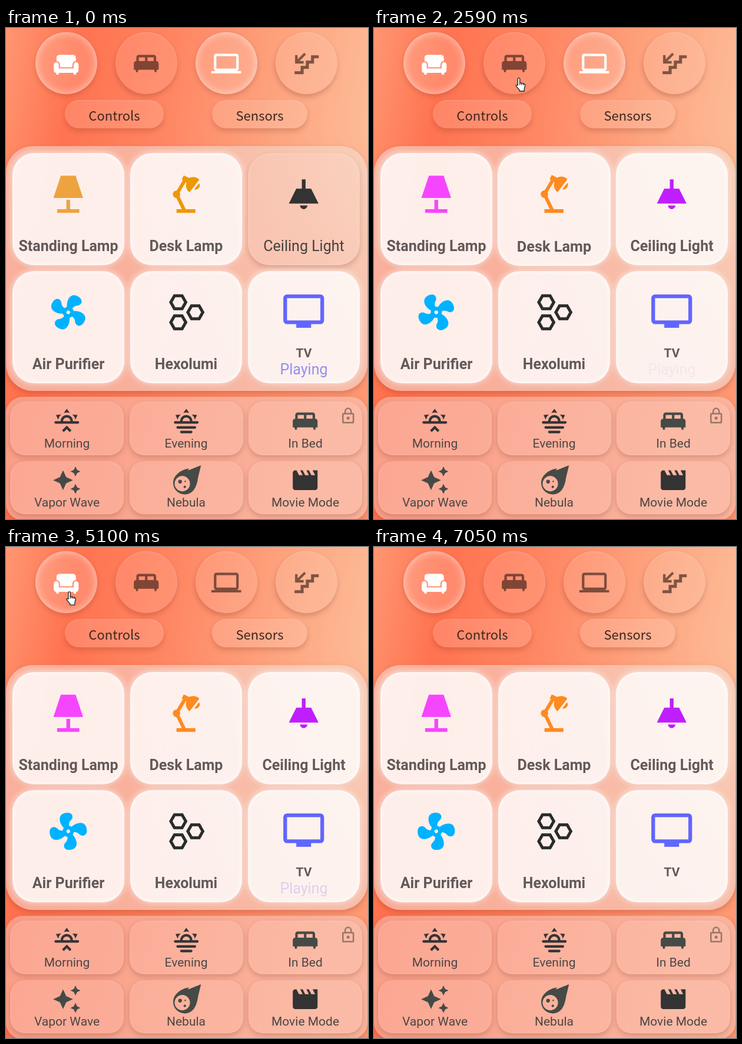
An HTML page for the animation above (7.1 s loop, 615x832 px).

```html
<!DOCTYPE html>
<html lang="en">
<head>
<meta charset="utf-8">
<style>
html, body { margin: 0; width: 100%; height: 100%; overflow: hidden; }
#stage {
  position: relative; width: 615px; height: 832px; overflow: hidden;
  font-family: Roboto, sans-serif;
  background:
    linear-gradient(rgba(255,110,75,0) 20%, rgba(255,110,75,.5) 75%),
    linear-gradient(100deg, #ff9672, #ff7350 17%, #ff8562 38%, #fda681 65%, #fdbf9a 88%);
}
#stage div, svg, span { position: absolute; box-sizing: border-box; }
svg { overflow: visible; fill: currentColor; }
.line { fill: none; stroke: currentColor; }
span { left: -20px; right: -20px; text-align: center; line-height: 30px; white-space: nowrap; }
.panel { background: rgba(244,228,222,.5); box-shadow: 0 4px 9px rgba(120,40,20,.25); }
.page { left: 0; top: 0; }
.round {
  border-radius: 50%; color: rgba(55,28,20,.63); background: rgba(255,255,255,.1);
  box-shadow: -1px 5px 9px rgba(120,40,20,.25), inset 0 1px 3px rgba(255,255,255,.2);
}
.round.lit {
  color: #fff; background: rgba(255,255,255,.16);
  box-shadow: 0 4px 9px rgba(120,40,20,.22), inset 0 0 14px rgba(255,255,255,.6);
}
.pill {
  border-radius: 24px; background: rgba(255,255,255,.13); color: #40261f;
  font: 300 22px "Noto Sans CJK JP", "Noto Sans CJK SC", "Noto Sans", sans-serif;
  box-shadow: 0 5px 9px rgba(120,40,20,.22), inset 0 1px 3px rgba(255,255,255,.15);
}
.tile {
  --on: 0; border-radius: 37px; color: #333; font-size: 25px;
  background: rgb(255 255 255 / calc(.09 + .71 * var(--on)));
  box-shadow:
    inset 0 0 6px 2px rgb(255 255 255 / calc(.1 + .6 * var(--on))),
    0 0 11px 2px rgb(255 240 234 / calc(.72 * var(--on))),
    0 5px 8px rgb(120 50 30 / calc(.22 - .16 * var(--on)));
}
.tile span { color: #474140; }
.tile.lit span { color: #635958; font-weight: 700; }
.tile.lit .state { color: #6b69f6; font-weight: 400; }
.scene {
  border-radius: 25px; font-size: 21px; color: #333; background: rgba(255,255,255,.09);
  box-shadow: 0 4px 8px rgba(120,50,30,.25), inset 0 0 4px rgba(255,255,255,.15);
}
.scene span { color: #4c4644; }
</style>
</head>
<body>
<div id="stage"></div>
<script>
const LOOP = 7100;
const stage = document.getElementById('stage');
const path = (d, attrs = 'fill-rule="evenodd"') => `<path d="${d}" ${attrs}/>`;
const line = (d, w) => path(d, `class="line" stroke-width="${w}"`);
const each = (n, f) => Array.from({ length: n }, (_, i) => f(i)).join('');

const sun = 'M3 12H7A5 5 0 0 1 17 12H21A1 1 0 0 1 21 14H3A1 1 0 0 1 3 12M15 12A3 3 0 0 0 9 12z' +
  'M12 2L14.4 5.4Q12 4.6 9.6 5.4zM3.3 7L7.5 6.65Q5.5 8.4 5.1 10.8zM20.7 7L18.9 10.8Q18.5 8.4 16.5 6.65z';
const hex = (x, y) => `M${x - 4.1} ${y}l2-3.5h4.1l2 3.5-2 3.5h-4.1z`;
const strip = (x, y) => path('M0 0h18v4H0z' + each(5, i => `M${1 + 3.55 * i} 1.1h1.8v1.8h-1.8z`),
  `fill-rule="evenodd" transform="translate(${x} ${y}) rotate(13)"`);

const icons = {
  sofa: path('M6.5 4h11a2.3 2.3 0 0 1 2.3 2.5V9a3 3 0 0 0-2.8 3v2H7v-2a3 3 0 0 0-2.8-3V6.5A2.3 2.3 0 0 1 6.5 4z' +
    'M2 12a2 2 0 0 1 4 0v3h12v-3a2 2 0 0 1 4 0v4.5a2 2 0 0 1-2 2V20h-2v-1.5H6V20H4v-1.5a2 2 0 0 1-2-2z'),
  bed: path('M20 10V7A2 2 0 0 0 18 5H6A2 2 0 0 0 4 7V10A2 2 0 0 0 2 12V17H3.3L4 19H5L5.7 17H18.3L19 19H20L20.7 17H22V12' +
    'A2 2 0 0 0 20 10M11 10H6V7H11zM18 10H13V7H18z'),
  laptop: path('M4 6H20V16H4zM20 18A2 2 0 0 0 22 16V6A2 2 0 0 0 20 4H4A2 2 0 0 0 2 6V16A2 2 0 0 0 4 18H0V20H24V18z'),
  stairs: line('M22 6.5h-5v4.3h-4.2v4.3H8.6v4.3H2.5', 2.4) + line('M11 4L4.5 10.5M3.9 5.2V11h5.9', 2),
  lamp: path('M8 2H16L20 14H4zM11 15H13V20H18V22H6V20H11z'),
  desk: path('M6.9 20H17.1V22H6.9zM10.8 1.8L13.6 3.2Q17 1.8 19.2 4.1L13.9 11Q11.4 9 12.2 5.6L9.7 4z' +
    'M19.1 6A2.3 2.3 0 0 1 16.5 9.4z') + '<circle cx="6.9" cy="12" r="2"/>' + line('M11 20.4L6.9 12L11.5 4.3', 1.9),
  ceiling: path('M8 9H11V4H13V9H16L20 17H4zM14 18A2 2 0 0 1 10 18z'),
  fan: path('M12 11A1 1 0 0 0 12 13A1 1 0 0 0 12 11M12.5 2C17 2 17.1 5.6 14.75 6.75C13.8 7.2 13.3 8.3 13.1 9.2' +
    'C13.6 9.4 14 9.7 14.35 10.1C18 8.1 22 8.9 22 12.5C22 17 18.5 17.1 17.3 14.7C16.8 13.7 15.7 13.3 14.8 13.1' +
    'C14.6 13.6 14.3 14 13.9 14.3C15.9 18 15 22 11.5 22C7 22 6.9 18.4 9.3 17.2C10.2 16.7 10.7 15.7 10.9 14.8' +
    'C10.4 14.6 10 14.3 9.65 13.9C6 15.8 2 15 2 11.5C2 7 5.6 6.9 6.7 9.3C7.2 10.2 8.3 10.7 9.2 10.9' +
    'C9.4 10.4 9.7 10 10.1 9.65C8.1 6 8.9 2 12.5 2z'),
  hexes: line(hex(7.9, 6.6) + hex(17.1, 12) + hex(7.9, 17.4), 1.6),
  tv: path('M21 17H3V5H21zM21 3H3A2 2 0 0 0 1 5V17A2 2 0 0 0 3 19H8V21H16V19H21A2 2 0 0 0 23 17V5A2 2 0 0 0 21 3z'),
  strips: strip(2.3, 2.9) + strip(4.2, 12.8) + path('M6.3 12.3L11.4 10.1 18 11.7 13.3 13.9z'),
  dragon: path('M16.5 2.4L20.5 2.1 24 4.5 24.1 7.6 21.5 8.5 19.3 7.2Q18 9.5 22 12.3Q25.5 15.5 23.5 20.5Q22.5 22 17 21.9' +
    'L0 21.4V20Q9 18.6 16 17.5Q11.5 14 13 7Q14 3.5 16.5 2.4z' +
    'M0 12.5Q5 5 12 4.8Q11.5 9 12.8 13.5L11 11.7 9 14 7 11.8 4.5 13.5 3 12z'),
  heater: path(each(3, i => `M${7.95 + 6 * i} 3l-1.42 2.2 1.42 2.2-2 3.1-1.73-.9 1.42-2.2-1.42-2.2 2-3.1z`) +
    'M2 22V14A2 2 0 0 1 4 12H20A2 2 0 0 1 22 14V22H20V20H4V22z' +
    each(4, i => `M${5 + 4 * i} 15a1 1 0 0 1 2 0v2a1 1 0 0 1-2 0z`)),
  sunrise: path(sun) + line('M8.9 20.1L12 17L15.1 20.1', 2),
  sunset: path(sun) + path('M5 17H19M8 20.7H16', 'class="line" stroke-width="2" stroke-linecap="round"'),
  sparkle: path('M19 1L17.7 3.7 15 5 17.7 6.3 19 9 20.3 6.3 23 5 20.3 3.7zM9 4L6.5 9.5 1 12 6.5 14.5 9 20 11.5 14.5 17 12 11.5 9.5z' +
    'M19 15L17.7 17.7 15 19 17.7 20.3 19 23 20.3 20.3 23 19 20.3 17.7z'),
  meteor: path('M23.9 0L21.5 10Q20.8 16 18 20A9.3 9.3 0 1 1 3.5 8.3Q7 3.9 14 2.5L13.4 4.2z' +
    'M15 14.8a6.2 6.2 0 1 0-12.4 0a6.2 6.2 0 1 0 12.4 0z') +
    '<circle cx="7" cy="13.2" r="1.5"/><circle cx="10.8" cy="17.4" r="1"/><circle cx="11.2" cy="13" r=".6"/>',
  movie: path('M18 4L20 8H17L15 4H13L15 8H12L10 4H8L10 8H7L5 4H4A2 2 0 0 0 2 6V18A2 2 0 0 0 4 20H20A2 2 0 0 0 22 18V4z'),
  lock: path('M12 17A2 2 0 0 1 12 13A2 2 0 0 1 12 17M18 20V10H6V20zM18 8A2 2 0 0 1 20 10V20A2 2 0 0 1 18 22H6A2 2 0 0 1 4 20V10' +
    'A2 2 0 0 1 6 8H7V6A5 5 0 0 1 17 6V8zM12 3A3 3 0 0 0 9 6V8H15V6A3 3 0 0 0 12 3z'),
};

const icon = (name, size, cx, cy) =>
  `<svg viewBox="0 0 24 24" style="left:${cx - size / 2}px;top:${cy - size / 2}px;width:${size}px;height:${size}px">${icons[name]}</svg>`;
const label = (text, cy, attrs = '') => `<span style="top:${cy - 15}px" ${attrs}>${text}</span>`;

function box(parent, cls, x, y, w, h, html = '') {
  const el = document.createElement('div');
  el.className = cls;
  el.style.cssText = `left:${x}px;top:${y}px;width:${w}px;height:${h}px`;
  el.innerHTML = html;
  parent.append(el);
  return el;
}

const hoverables = [];
function hoverable(parent, cls, x, y, w, h, html) {
  const el = box(parent, cls, x, y, w, h, html);
  hoverables.push({ el, x, y, w, h });
  return el;
}

const rounds = ['sofa', 'bed', 'laptop', 'stairs'].map((name, i) =>
  box(stage, 'round', 50 + 136 * i, 7, 105, 105, icon(name, 50.5, 52.5, name == 'sofa' ? 55 : 53.5)));
rounds[0].classList.add('lit');
box(stage, 'pill', 100, 122, 168, 48, label('Controls', 25));
box(stage, 'pill', 350, 122, 162, 48, label('Sensors', 25));
box(stage, 'panel', 0, 200, 614, 415).style.borderRadius = '46px';
const scenes = box(stage, 'panel', 0, 625, 614, 209);
scenes.style.cssText += 'border-radius:28px;background:rgba(244,220,214,.42)';

const pages = [0, 1].map(() => box(stage, 'page', 0, 0, 0, 0));
function tile(page, i, name, text, color) {
  const html = icon(name, 75.5, 95, name == 'tv' ? 67.6 : 70) +
    (name == 'tv' ? label(text, 139, 'id="tv"') + label('Playing', 167, 'class="state"') : label(text, 158));
  const el = hoverable(pages[page], 'tile', 11 + 200 * (i % 3), 212 + 200 * (i / 3 | 0), 190, 190, html);
  if (color) light(el, 1, color);
  return el;
}
function light(el, on, color) {
  el.style.setProperty('--on', on);
  el.classList.toggle('lit', on > 0);
  el.style.color = color;
}

const standing = tile(0, 0, 'lamp', 'Standing Lamp');
const desk = tile(0, 1, 'desk', 'Desk Lamp');
const ceiling = tile(0, 2, 'ceiling', 'Ceiling Light');
const fan = tile(0, 3, 'fan', 'Air Purifier', '#00b2ff').querySelector('svg');
tile(0, 4, 'hexes', 'Hexolumi', '#2b2b2b');
const state = tile(0, 5, 'tv', 'TV', '#6165ff').querySelector('.state');
document.getElementById('tv').style.fontSize = '21px';

tile(1, 0, 'strips', 'Light Strip');
tile(1, 1, 'desk', 'Desk Lamp 1');
tile(1, 2, 'desk', 'Desk Lamp 2');
tile(1, 3, 'dragon', "Drex's Lights", '#333');
tile(1, 4, 'heater', 'Tank Heater');

[['sunrise', 'Morning'], ['sunset', 'Evening'], ['bed', 'In Bed'],
 ['sparkle', 'Vapor Wave'], ['meteor', 'Nebula'], ['movie', 'Movie Mode']].forEach(([name, text], i) => {
  const y = i < 3 ? 633 : 734;
  const el = hoverable(stage, 'scene', 7 + 202.5 * (i % 3), y, 193, i < 3 ? 91 : 90,
    icon(name, 50.5, 96.5, (i < 3 ? 666 : 766) - y) + label(text, i < 3 ? 71 : 70));
  if (/bed|sparkle|meteor/.test(name)) el.style.color = '#454a47';
});
box(stage, '', 566, 642, 30, 30, icon('lock', 30.5, 15, 15.5)).style.color = 'rgba(75,60,58,.55)';

const hand = box(stage, '', 0, 0, 18, 25, `<svg width="18" height="25" fill="#fff" stroke="#222" stroke-width="1.3" stroke-linejoin="round">
  <path fill="#fff" d="M4 2.4a1.7 1.7 0 0 1 3.4 0v6.3l6.6 1.6q2.6.7 2.3 3.4l-1.3 5.2V23H6.8v-2.2L1.2 14.6q-.8-1.9 1-2.3L4 13.3z"/>
  <path fill="none" d="M7.4 8.5v4M10.4 9.5v3M13.4 10.3v2.4"/></svg>`);

// Pointer route: time, x, y
const route = [
  [60, 335, 860], [600, 307, 742], [1520, 307, 741], [1900, 312, 600], [2400, 290, 212], [2590, 246, 84],
  [2950, 252, 82], [3420, 347, 52], [3700, 352, 56], [4000, 320, 330], [4200, 322, 400], [4450, 295, 212],
  [4570, 127, 36], [4850, 112, 50], [5250, 105, 90], [5400, 105, 212], [5600, 120, 402], [5685, 122, 412],
  [5790, 158, 588], [6050, 160, 600], [6550, 190, 860],
];
function pointer(t) {
  const i = route.findIndex(p => p[0] > t);
  if (i < 1) return [-99, -99];
  const [a, b] = [route[i - 1], route[i]];
  const k = (t - a[0]) / (b[0] - a[0]);
  return [a[1] + (b[1] - a[1]) * k, a[2] + (b[2] - a[2]) * k];
}

const clamp = v => Math.max(0, Math.min(1, v));
const easeOut = v => 1 - (1 - v) ** 2.5;

function render(t) {
  const trail = Array.from({ length: 13 }, (_, i) => pointer(t - i * 20));
  hand.style.transform = `translate(${trail[0][0] - 5.7}px, ${trail[0][1]}px)`;
  for (const { el, x, y, w, h } of hoverables) {
    const inside = trail.filter(([px, py]) => px > x && px < x + w && py > y && py < y + h).length;
    el.style.transform = inside ? `scale(${1 + .05 * inside / trail.length})` : '';
  }

  const second = t >= 3650 && t < 4800;
  pages[0].style.display = second ? 'none' : '';
  pages[1].style.display = second ? '' : 'none';
  rounds[2].classList.toggle('lit', t < 3800);

  light(standing, 1, t < 1000 ? '#eda340' : '#f645ff');
  light(desk, 1, t < 1150 ? '#ed9806' : '#ff8a20');
  light(ceiling, clamp((t - 1400) / 500), t < 1400 ? '#333' : '#c01eff');

  fan.style.transform = `rotate(${25 + 90 * t / 483}deg)`;
  const pulse = (t + 1150) % 2050 / 1025;
  state.style.opacity = pulse < 1 ? easeOut(pulse) : 1 - easeOut(pulse - 1);
}

const start = performance.now();
function tick() {
  render((performance.now() - start) % LOOP);
  requestAnimationFrame(tick);
}
tick();
</script>
</body>
</html>
```
